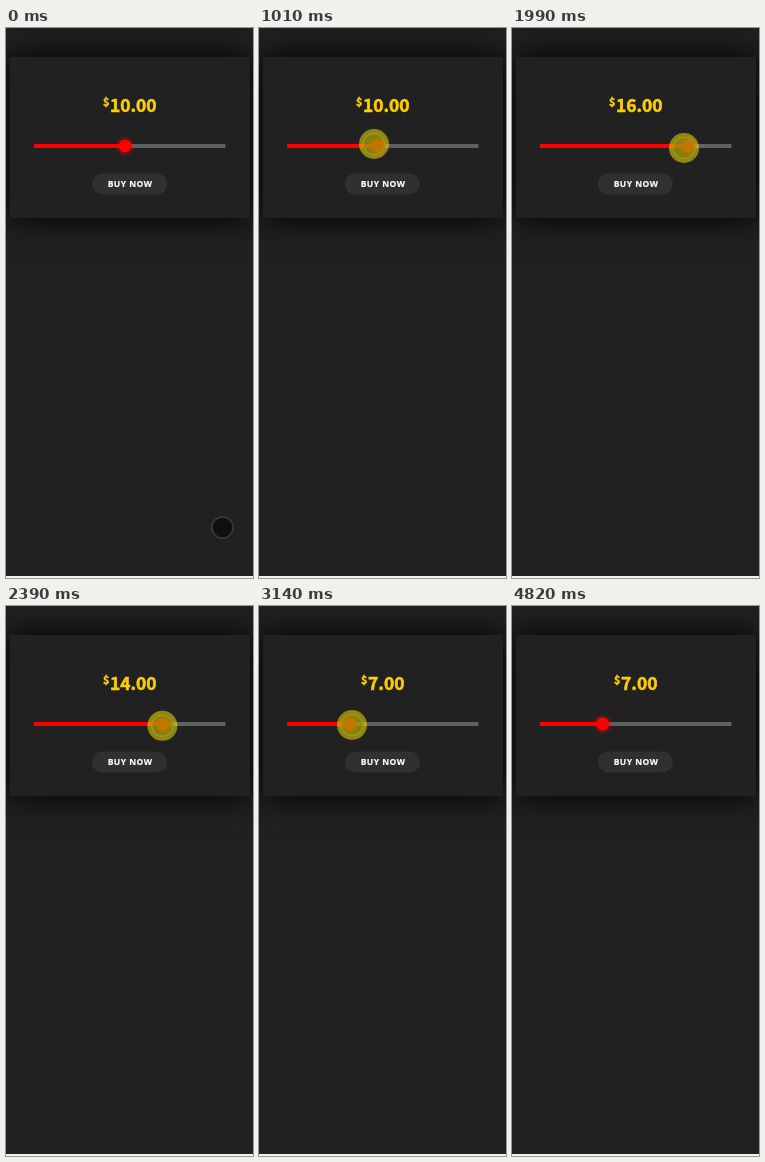
Write an HTML page that moves like this. It is 247 by 550 pixels and loops after 4.89 s.

```html
<!DOCTYPE html>
<html lang="en">
<head>
<meta charset="utf-8">
<title>Price slider</title>
<style>
  html, body { margin: 0; width: 100%; height: 100%; overflow: hidden; background: #212121; }
  .card {
    position: absolute; left: 4px; top: 29px; width: 240px; height: 161px;
    background: #212121; box-shadow: 0 0 32px 1px #000;
  }
  svg { position: absolute; left: 0; top: 0; }
  text { text-anchor: middle; font-weight: 700; }
  .price {
    font-family: "Noto Sans CJK JP", "Noto Sans CJK SC", "Open Sans", sans-serif;
    font-size: 17.4px; fill: #ffce00; stroke: #ffce00; stroke-width: .6px;
  }
  .currency { font-size: 10.8px; }
  .label {
    font-family: "Open Sans", "Noto Sans", sans-serif;
    font-size: 8.5px; letter-spacing: .45px; fill: #fff; stroke: #fff; stroke-width: .2px;
  }
</style>
</head>
<body>
<div class="card"></div>
<svg width="247" height="550" viewBox="0 0 247 550">
  <text class="price" x="123.8" y="78"><tspan class="currency">$</tspan><tspan id="amount" dx=".6" dy="6">10.00</tspan></text>

  <rect x="28" y="116" width="191.5" height="4" rx="1" fill="#616161"/>
  <rect id="fill" x="28" y="116" height="4" rx="1" fill="#f00"/>
  <g id="thumb" fill="#f00">
    <circle r="9.3" opacity=".25"/>
    <circle r="6.5"/>
  </g>

  <rect x="86" y="145.5" width="75" height="21" rx="10.5" fill="#303030"/>
  <text class="label" x="124" y="159">BUY NOW</text>

  <g id="pointer">
    <circle r="10.6" fill="#000" fill-opacity=".5" stroke="#3a3a3a" stroke-width="1.7"/>
    <circle id="halo" r="15" fill="#fe0" fill-opacity=".5"/>
  </g>
  <rect y="548" width="247" height="2" fill="#f5efef"/>
</svg>
<script>
  const DURATION = 4890;
  const PRESS_START = 800, PRESS_END = 3540;
  const DRAG_START = 1050, DRAG_END = 3400, DRAG_LAG = 40;
  const TRACK_LEFT = 28, TEN_DOLLARS_X = 119, DOLLAR_WIDTH = 9.5;

  const origin = { x: 216.5, y: 499.5 };
  const moves = [
    { from: 0, to: 530, x: 115, y: 96 },
    { from: 560, to: 860, x: 115, y: 116 },
    { from: 1050, to: 1800, x: 172, y: 120 },
    { from: 2120, to: 3070, x: 93, y: 119 },
    { from: 3490, to: 4020, x: 224.5, y: 517.5 },
    { from: 4020, to: 4220, x: 224, y: 565 }
  ];

  const [amount, fill, thumb, pointer, halo] =
    ["amount", "fill", "thumb", "pointer", "halo"].map(id => document.getElementById(id));

  const clamp = (v, min, max) => Math.min(max, Math.max(min, v));
  const smooth = k => k * k * (3 - 2 * k);
  const place = (node, x, y) => node.setAttribute("transform", `translate(${x} ${y})`);

  function pointerAt(time) {
    return moves.reduce((p, move) => {
      const k = smooth(clamp((time - move.from) / (move.to - move.from), 0, 1));
      return { x: p.x + (move.x - p.x) * k, y: p.y + (move.y - p.y) * k };
    }, origin);
  }

  // The slider trails the pointer slightly and snaps to whole dollars.
  function priceAt(time) {
    const { x } = pointerAt(clamp(time - DRAG_LAG, DRAG_START, DRAG_END));
    return Math.round(10 + (x - TEN_DOLLARS_X) / DOLLAR_WIDTH);
  }

  function draw(now) {
    const time = now % DURATION;
    const { x, y } = pointerAt(time);
    const price = priceAt(time);
    const thumbX = TEN_DOLLARS_X + (price - 10) * DOLLAR_WIDTH;

    amount.textContent = price.toFixed(2);
    fill.setAttribute("width", thumbX - TRACK_LEFT);
    place(thumb, thumbX, 118);
    place(pointer, x, y);
    halo.style.display = time >= PRESS_START && time < PRESS_END ? "" : "none";
    requestAnimationFrame(draw);
  }
  draw(0);
</script>
</body>
</html>
```
